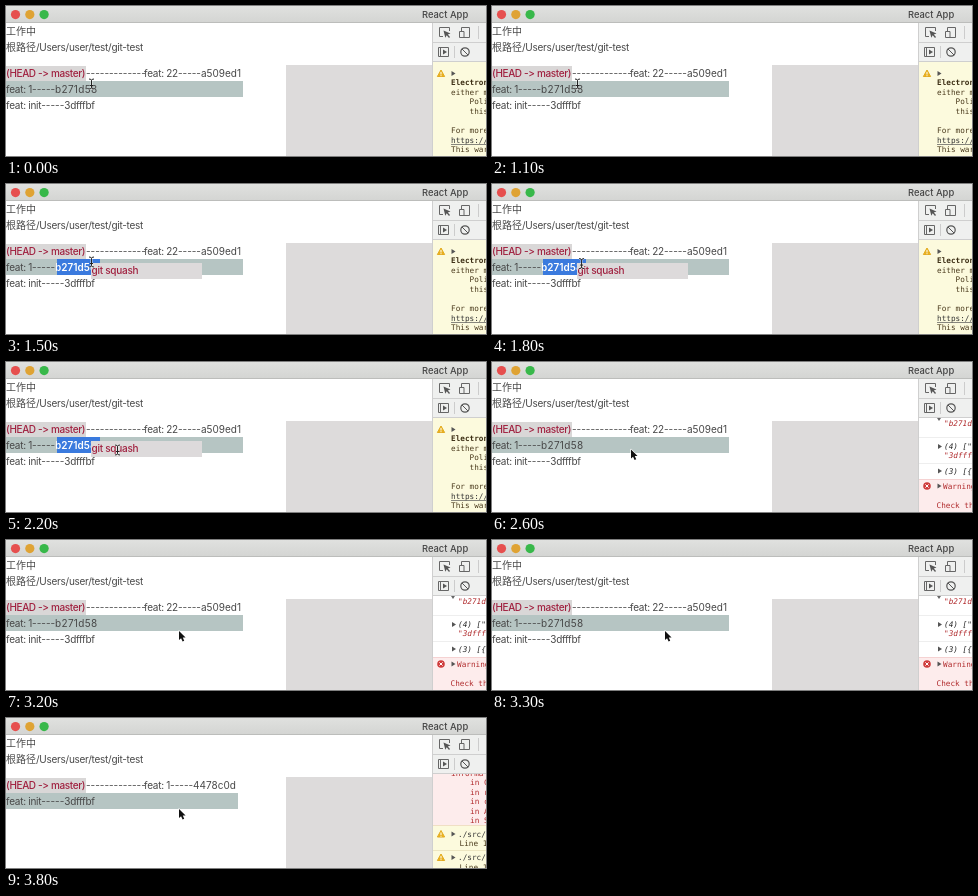
Recreate the animation shown at these times as an HTML page with a canvas. Size 480 by 150 pixels, loop 3.9 s.

```html
<!DOCTYPE html>
<html lang="zh">
<head>
<meta charset="utf-8">
<title>React App</title>
<style>
html, body { margin: 0; width: 100%; height: 100%; overflow: hidden; background: #fff; }
canvas { display: block; }
</style>
</head>
<body>
<canvas id="stage" width="480" height="150"></canvas>
<script>
const ctx = document.getElementById('stage').getContext('2d');
const LOOP = 3900;
const MENU_OPEN = 1300, MENU_CLOSE = 2400, LIST_UPDATE = 3500;
const SANS = '10px Inter, sans-serif', MEDIUM = '500 ' + SANS, BOLD = '600 ' + SANS;
const CJK = '10px "Noto Sans CJK SC", "Noto Sans CJK", sans-serif';
const MONO = '7.7px "DejaVu Sans Mono", monospace';
const INK = '#484848', CRIMSON = '#a0203f', RED = '#b02a2c', BROWN = '#4a3a1c';
const TIGHT = -0.27;

function rect(x, y, w, h, color) {
  ctx.fillStyle = color;
  ctx.fillRect(x, y, w, h);
}

// Draws text and returns the x where it ends
function text(str, x, y, color = INK, font = SANS, spacing = TIGHT) {
  ctx.font = font;
  ctx.letterSpacing = spacing + 'px';
  ctx.fillStyle = color;
  ctx.fillText(str, x, y);
  return x + ctx.measureText(str).width;
}

const mono = (str, x, y, color = BROWN, style = '') => text(str, x, y, color, style + ' ' + MONO, 0);

function shape(d, fill, stroke, x = 0, y = 0, width = 1, scale = 1) {
  const path = new Path2D(d);
  ctx.save();
  ctx.translate(x, y);
  ctx.scale(scale, scale);
  ctx.lineWidth = width;
  ctx.lineJoin = 'round';
  if (stroke) { ctx.strokeStyle = stroke; ctx.stroke(path); }
  if (fill) { ctx.fillStyle = fill; ctx.fill(path); }
  ctx.restore();
}

function disc(x, y, r, fill, stroke) {
  ctx.beginPath();
  ctx.arc(x, y, r, 0, 2 * Math.PI);
  if (fill) { ctx.fillStyle = fill; ctx.fill(); }
  if (stroke) { ctx.strokeStyle = stroke; ctx.lineWidth = 1.2; ctx.stroke(); }
}

const arrow = (x, y) => shape('M0-2.5L4 0L0 2.5Z', '#555', null, x, y);

function warning(x, y) {
  shape('M0-3.5L3.6 3H-3.6Z', '#e9b020', '#dda51c', x, y);
  rect(x - 0.5, y - 1.5, 1, 2.5, '#fff');
  rect(x - 0.5, y + 1.7, 1, 1, '#fff');
}

// Returns the x where the hash starts
function commit(x, y, subject, hash, hashGap = 0) {
  const subjectX = text('feat: ', x, y);
  const dashX = text(subject, subjectX, y);
  const hashX = text('-----', dashX, y, INK, SANS, 0);
  text(hash, hashX, y, INK, SANS, hashGap);
  return hashX;
}

function drawChrome() {
  rect(0, 0, 480, 150, '#fff');
  const bar = ctx.createLinearGradient(0, 0, 0, 16);
  bar.addColorStop(0, '#e0e1df');
  bar.addColorStop(1, '#d4d5d3');
  rect(0, 0, 480, 16, bar);
  rect(0, 16, 480, 1, '#bcbdbb');
  ['#e64f4e', '#dfa334', '#38b84a'].forEach((color, i) => disc(9.5 + 14.3 * i, 8.6, 4.6, color));
  text('React App', 416, 12, '#444', '500 9.4px Inter, sans-serif', 0);
  text('工作中', 0, 28.7, INK, CJK, 0);
  const pathX = text('根路径', 0, 45, INK, CJK, 0);
  text('/Users/user/test/git-test', pathX, 45);
  rect(280, 59, 146, 91, '#dddbdb');
}

function drawToolbar() {
  rect(426, 17, 54, 39, '#eff0ef');
  rect(426, 36, 54, 1, '#cfcfcf');
  rect(426, 55, 54, 1, '#cfcfcf');
  rect(426, 17, 1, 133, '#cfcfcf');
  shape('M437 30.5H433.5V21.5H443.5V25', null, '#666');
  shape('M437.5 24.5L444.5 27.5L441.8 28.4L444 31L443 32L440.7 29.3L439.3 31.7Z', '#555');
  shape('M455.5 25V21.5H463.5V31.5H458M453.5 25.5H458V31.5H453.5Z', null, '#666');
  rect(472, 20, 1, 13, '#ccc');
  shape('M432.5 41.5H442.5V50.5H432.5ZM434.5 41.5V50.5', null, '#666');
  shape('M437 43.5L441 46L437 48.5Z', '#555');
  rect(448, 40, 1, 12, '#ccc');
  disc(459, 46, 4.2, null, '#555');
  shape('M456 43L462 49', null, '#555');
}

function drawIntroWarning() {
  rect(427, 56, 53, 94, '#fcfadd');
  warning(435, 67.5);
  arrow(445.5, 67.5);
  mono('Electron', 445, 79, '#3c2e14', 'bold');
  mono('either m', 445, 88.5);
  mono('Poli', 463.5, 98);
  mono('this', 463.5, 107.5);
  mono('For more', 445, 127);
  mono('https://', 445, 136.5, '#333');
  rect(445, 138, 35, 0.7, '#555');
  mono('This war', 445, 146);
}

function drawLogs() {
  rect(427, 56, 53, 62, '#fff');
  shape('M445 56H449L447 59Z', '#666');
  mono('"b271d58"', 452, 64, RED, 'italic');
  rect(427, 75, 53, 1, '#eee');
  arrow(446, 84.5);
  mono('(4) ["', 452, 87, '#222', 'italic');
  mono('"3dfffbf"', 452, 96, RED, 'italic');
  rect(427, 101, 53, 1, '#eee');
  arrow(446, 109);
  mono('(3) [{', 452, 112, '#222', 'italic');
  rect(427, 117, 53, 33, '#fdecec');
  rect(427, 117, 53, 1, '#f5d2d2');
  disc(435, 124, 3.8, '#cf3b3b');
  shape('M433.4 122.4L436.6 125.6M436.6 122.4L433.4 125.6', null, '#fff');
  arrow(445.5, 124);
  mono('Warning', 451, 127, RED);
  mono('Check th', 444.5, 146, RED);
}

function drawStack() {
  ctx.save();
  ctx.beginPath();
  ctx.rect(427, 56, 53, 94);
  ctx.clip();
  rect(427, 56, 53, 51, '#fdecec');
  mono('informa', 445, 58, RED);
  [...'CrcAS'].forEach((name, i) => mono('in ' + name, 464, 67 + 9.6 * i, RED));
  rect(427, 107, 53, 43, '#fcfadd');
  rect(427, 107, 53, 1, '#f0dfc4');
  rect(427, 132, 53, 1, '#ece5c0');
  for (const y of [116, 139.5]) {
    warning(435, y);
    arrow(445.5, y);
    mono('./src/', 452, y + 2.7, '#333');
    mono('Line 1', 453.5, y + 12);
  }
  ctx.restore();
}

function drawList(updated, menuOpen) {
  rect(0, 60, 80, 15, '#d9d7d7');
  // Two pieces, so that "->" does not become an arrow glyph
  const headX = text('(HEAD -', 0, 71, CRIMSON, MEDIUM, -0.36);
  text('> master)', headX, 71, CRIMSON, MEDIUM, -0.36);
  text('-'.repeat(13), 80, 71, INK, SANS, 0);
  rect(0, 75, updated ? 232 : 237, 16, '#b6c5c3');
  if (updated) {
    commit(138, 71, '1', '4478c0d');
    commit(0, 87, 'init', '3dfffbf', TIGHT);
    return;
  }
  commit(138, 71, '22', 'a509ed1');
  const hashX = commit(0, 87, '1', 'b271d58', 0.3);
  commit(0, 103, 'init', '3dfffbf', TIGHT);
  if (menuOpen) {
    rect(51, 75, 43, 16, '#3a7ade');
    text('b271d58', hashX, 87, '#fff', BOLD, 0);
    rect(85, 79, 111, 16, '#dddadb');
    text('git squash', 85.5, 90, CRIMSON, MEDIUM);
  }
}

// Pointer keys: time, x, y
const pointerKeys = [
  [0, 85.5, 78], [1700, 85.5, 78], [2100, 111.5, 88], [2400, 111.5, 88],
  [2600, 139, 87.5], [2700, 139, 87.5], [3100, 173, 91], [LOOP, 173, 91]
];

function pointerAt(t) {
  const i = pointerKeys.findIndex(key => key[0] > t);
  const [t0, x0, y0] = pointerKeys[i - 1], [t1, x1, y1] = pointerKeys[i];
  const u = (t - t0) / (t1 - t0), ease = u * u * (3 - 2 * u);
  return [x0 + (x1 - x0) * ease, y0 + (y1 - y0) * ease];
}

function drawPointer(t) {
  const [x, y] = pointerAt(t);
  if (t < MENU_CLOSE) {
    const beam = 'M-2.5-5Q0-5 0-3.5Q0-5 2.5-5M0-3.5V3.5M-2.5 5Q0 5 0 3.5Q0 5 2.5 5M-1.5 1.5H1.5';
    shape(beam, null, 'rgba(255,255,255,.6)', x, y, 2.2);
    shape(beam, null, '#222', x, y);
  } else {
    shape('M0 0V10L2.3 8L4 11.7L5.8 10.9L4.2 7.3H7.3Z', '#111', '#fff', x, y, 1.4, 0.9);
  }
}

function draw(now) {
  const t = Math.floor(now % LOOP / 100) * 100;
  const updated = t >= LIST_UPDATE;
  drawChrome();
  drawList(updated, t >= MENU_OPEN && t < MENU_CLOSE);
  drawToolbar();
  if (updated) drawStack();
  else if (t >= MENU_CLOSE) drawLogs();
  else drawIntroWarning();
  drawPointer(t);
}

const start = performance.now();
function tick() {
  draw(performance.now() - start);
  requestAnimationFrame(tick);
}
tick();
</script>
</body>
</html>
```
